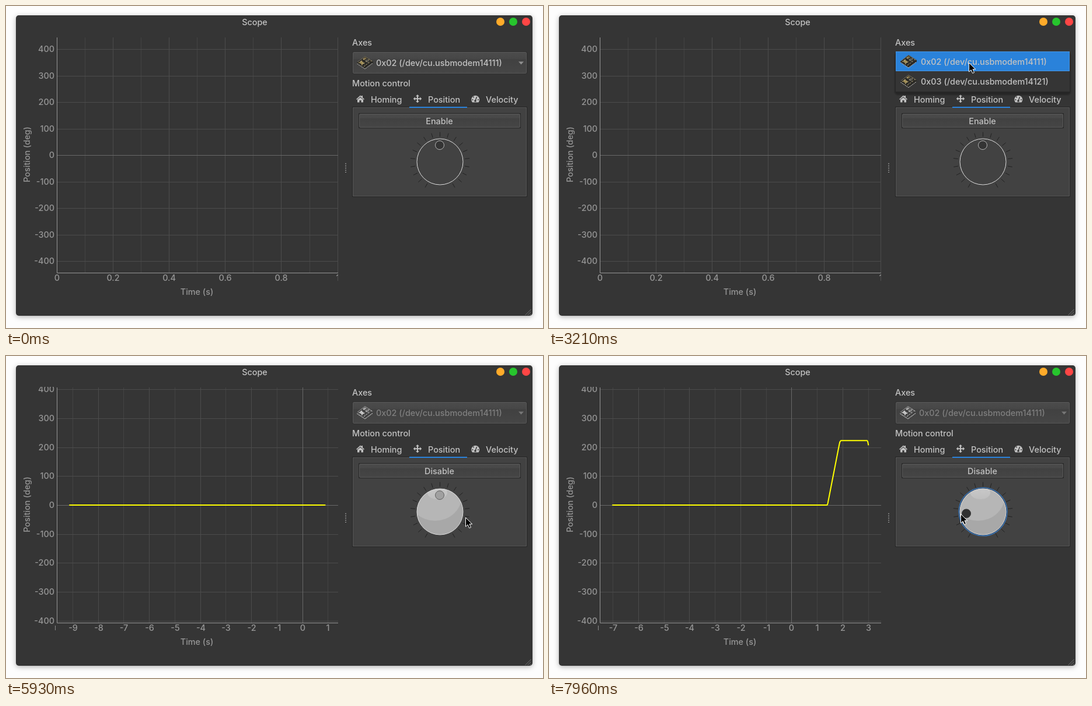
Animation of 920x553 px, one loop 8 s. Source, as an HTML page:

```html
<!DOCTYPE html>
<html lang="en">
<head>
<meta charset="utf-8">
<title>Scope</title>
<style>
html, body { margin: 0; width: 100%; height: 100%; overflow: hidden; background: #fdfdfd; }
svg { display: block; width: 920px; height: 553px; font: 500 14.4px Inter, Roboto, sans-serif; }
text { fill: #c2c2c2; white-space: pre; }
.axis text { fill: #969696; }
.mid { text-anchor: middle; }
.end { text-anchor: end; }
.win { filter: drop-shadow(0 2px 4px rgba(0,0,0,.3)); }
</style>
</head>
<body>
<svg viewBox="0 0 920 553">
  <defs>
    <linearGradient id="face" x1="0" y1="0" x2="0" y2="1">
      <stop offset="0" stop-color="#4c4c4c"/><stop offset=".3" stop-color="#474747"/>
      <stop offset=".34" stop-color="#414141"/><stop offset="1" stop-color="#464646"/>
    </linearGradient>
    <linearGradient id="gloss" x1="0" y1="0" x2="0" y2="1">
      <stop offset="0" stop-color="#cacaca"/><stop offset="1" stop-color="#bfbfbf"/>
    </linearGradient>
    <clipPath id="plotClip"><rect x="88" y="54" width="481" height="405"/></clipPath>
    <clipPath id="xClip"><rect x="83" y="459" width="486" height="20"/></clipPath>
    <clipPath id="yClip"><rect x="40" y="53" width="47" height="420"/></clipPath>
    <clipPath id="dialClip"><circle cx="743.5" cy="267.5" r="39.5"/></clipPath>
    <g id="board" fill="none">
      <path d="M0 11L14 0L28 9L28 12L14 22L0 13Z" fill="#2b2a26"/>
      <path d="M1 10.5L14 .5L27 9" stroke="#77715f"/>
      <path d="M4 11L8 8L13 12L9 15Z" fill="#a08d55"/>
      <path d="M10 5L14 2L17 4L13 7Z" fill="#80714a"/>
      <path d="M14 8L18 5L22 8L18 11Z" fill="#55544e"/>
      <path d="M3 12L15 3M8 16L22 5M12 18L25 8" stroke="#d3bf83" stroke-dasharray="2 3"/>
      <path d="M6 9L16 17M11 5L21 13" stroke="#e9e4d2" stroke-dasharray="1 4"/>
      <path d="M.5 13L14 22L27.5 12" stroke="#d8d8d8" stroke-dasharray="2 1"/>
    </g>
  </defs>

  <rect class="win" x="17" y="16" width="885" height="516" rx="5" fill="#353535"/>
  <text class="mid" x="426" y="33">Scope</text>
  <circle cx="847" cy="27" r="7" fill="#ffab2a"/>
  <circle cx="869" cy="27" r="7" fill="#27c52d"/>
  <circle cx="891" cy="27" r="7" fill="#ff4645"/>

  <g class="axis">
    <g id="grid" clip-path="url(#plotClip)" fill="none">
      <path id="minor" stroke="#434343"/>
      <path id="major" stroke="#4c4c4c"/>
      <path id="zero" stroke="#686868"/>
    </g>
    <path d="M87.5 54V458.5H569" stroke="#969696" fill="none"/>
    <path id="edge" d="M84.5 463V471" stroke="#8a8a8a"/>
    <g id="yLabels" class="end" clip-path="url(#yClip)"></g>
    <g id="xLabels" class="mid" clip-path="url(#xClip)"></g>
    <text class="mid" x="327" y="496">Time (s)</text>
    <text class="mid" transform="translate(41 255) rotate(-90)">Position (deg)</text>
    <path id="trace" clip-path="url(#plotClip)" stroke="#ff0" stroke-width="2" stroke-linejoin="round" fill="none"/>
  </g>

  <path d="M582 270V288" stroke="#a4a4a4" stroke-width="2" stroke-dasharray="1 2"/>
  <path d="M890 530.5l10 -10M894 530.5l6 -6M898 530.5l2 -2" stroke="#b4b4b4" stroke-dasharray="1.4 1.4"/>

  <text x="593" y="68">Axes</text>
  <rect x="593.5" y="78.5" width="299" height="38" rx="1" fill="#292929"/>
  <rect x="594.5" y="79.5" width="297" height="36" rx="1" fill="url(#face)" stroke="#595959"/>
  <g id="combo"><use href="#board" x="601" y="86"/></g>
  <text id="port" x="634" y="103">0x02 (/dev/cu.usbmodem14111)</text>
  <path id="arrow" d="M878 95.5h9l-4.5 5Z" fill="#8f8f8f"/>
  <text x="593" y="138">Motion control</text>

  <rect x="593.5" y="173.5" width="299" height="154" fill="#424242" stroke="#252525"/>
  <path d="M594.5 326.5V174.5H891.5V326.5Z" stroke="#565656" fill="none"/>
  <g fill="#c2c2c2">
    <path d="M600 160L607 153.5L609 155.3V154H611V157.3L614 160L613 161L607 155.8L601 161ZM602 161L607 157L612 161V165.5H608.5V162H605.5V165.5H602Z"/>
    <path d="M705 152l3 3.2h-2v3h3.2v-2l3 3l-3 3v-2h-3.2v3h2l-3 3l-3 -3h2v-3h-3.2v2l-3 -3l3 -3v2h3.2v-3h-2Z"/>
    <path d="M799 165.5A7 7 0 1 1 809.5 165.5Z"/>
  </g>
  <path d="M804 163L806.5 156" stroke="#353535" stroke-width="1.4"/>
  <g fill="#353535"><circle cx="804" cy="163" r="1.8"/><circle cx="799.3" cy="161" r="1"/><circle cx="801" cy="156.6" r="1"/><circle cx="809" cy="161" r="1"/></g>
  <text x="625" y="166">Homing</text>
  <text x="723" y="166">Position</text>
  <text x="822" y="166">Velocity</text>
  <rect x="691" y="173" width="99" height="2" fill="#2a82da"/>

  <rect x="604" y="184" width="278" height="26" rx="1" fill="#262626"/>
  <rect id="button" x="605.5" y="185.5" width="275" height="23" rx="1"/>
  <text id="action" class="mid" x="742.5" y="203"></text>

  <path id="notches" stroke="#222"/>
  <circle id="focus" cx="743.5" cy="267.5" r="41.3" stroke="#3873b5" stroke-width="1.6" fill="#343a42"/>
  <g id="knob" clip-path="url(#dialClip)">
    <rect x="703" y="227" width="81" height="81" fill="#a8a8a8"/>
    <ellipse cx="735" cy="240" rx="46" ry="43" fill="#b6b6b6"/>
    <ellipse cx="739" cy="235" rx="17" ry="11" fill="url(#gloss)"/>
  </g>
  <circle cx="743.5" cy="267.5" r="39.5" stroke="#dedede" fill="none"/>
  <circle id="handle" r="7.5"/>

  <g id="popup">
    <rect x="591" y="79" width="304" height="75" rx="7" fill="#222" opacity=".35"/>
    <rect x="593" y="78" width="300" height="74" rx="5" fill="#262626"/>
    <rect x="594" y="78" width="298" height="69" fill="#353535"/>
    <rect id="hot" x="594.5" width="297" height="33" fill="#2a82da" stroke="#4595e2"/>
    <use href="#board" x="602" y="84"/><use href="#board" x="602" y="118"/>
    <text x="637" y="101">0x02 (/dev/cu.usbmodem14111)</text>
    <text x="637" y="135">0x03 (/dev/cu.usbmodem14121)</text>
  </g>
  <path id="cursor" d="M0 0V15.5L3.6 12.2L6.2 18L9 16.8L6.5 11.2H11.3Z" fill="#000" stroke="#fff" stroke-linejoin="round"/>
</svg>
<script>
const $ = id => document.getElementById(id);
const LOOP = 8000, OPEN = 2050, CLOSE = 3700, ENABLE = 5010, TURN = 6375, BACK = 7895;
const SPEED = 43.75; // plot pixels per second

// screen updates: start, end, count
const bursts = [[1500, 2130, 9], [2550, 3210, 12], [3630, 4350, 11], [4470, 4470, 1],
  [5010, 5760, 14], [5820, 6610, 15], [6670, 7430, 14], [7490, 7960, 9]];
const clock = [[5010, 0], [5930, .914], [6720, 1.766], [7490, 2.526], [7960, 3.018]];
const path = [[1500, 738, -4], [1980, 721, 94], [2550, 720, 95], [2820, 724, 126], [2930, 724, 127],
  [3210, 719, 97], [3700, 719, 97], [4350, 693, 202], [5080, 693, 202], [5700, 786, 276],
  [5930, 787, 277], [6050, 787, 277], [6340, 772, 266], [6760, 772, 266], [6880, 778, 268],
  [7400, 705, 270], [7960, 705, 271]];

function snap(t) {
  let s = 0;
  for (const [a, b, n] of bursts) {
    for (let i = 0; i < n; i++) {
      const u = Math.floor((a + (b - a) * i / Math.max(1, n - 1)) / 10) * 10;
      if (u <= t) s = u;
    }
  }
  return s;
}

function along(keys, t, ease = p => p) {
  if (t <= keys[0][0]) return keys[0].slice(1);
  for (let i = 1; i < keys.length; i++) {
    const a = keys[i - 1], b = keys[i];
    if (t <= b[0]) {
      const p = ease((t - a[0]) / (b[0] - a[0]));
      return a.slice(1).map((v, k) => v + (b[k + 1] - v) * p);
    }
  }
  return keys[keys.length - 1].slice(1);
}
const smooth = p => p * p * (3 - 2 * p);
const show = (id, on) => $(id).setAttribute('display', on ? 'inline' : 'none');
const set = (id, attrs) => { for (const k in attrs) $(id).setAttribute(k, attrs[k]); };
const label = (x, y, s) => `<text x="${x}" y="${y}">${s}</text>`;

function drawAxes(on, now) {
  const d = { minor: '', major: '', zero: '' };
  const pxX = on ? SPEED : 480.6, pxY = on ? .4965 : .455;
  const x0 = on ? 548 - now * pxX : 87.5;
  const step = on ? 1 : .1;
  const first = on ? Math.ceil(now - 10.5) : 0, last = on ? Math.floor(now + .5) : 10;
  const evens = Math.floor(last / 2) - Math.ceil(first / 2) + 1;
  let xs = '', ys = '';
  for (let i = first; i <= last; i++) {
    const x = Math.floor(x0 + i * step * pxX), even = i % 2 === 0;
    d[i === 0 ? 'zero' : even ? 'major' : 'minor'] += `M${x + .5} 54V458`;
    // odd labels vanish when six even ones already fit
    if (even || (on && evens < 6)) xs += label(x + (i < 0 ? 1 : .5), 472, on ? i : +(i * step).toFixed(1));
  }
  for (let v = -400; v <= 400; v += 100) {
    const y = Math.round(256 - v * pxY);
    d[v ? 'major' : 'zero'] += `M88 ${y + .5}H569`;
    ys += label(83, y + 5, v);
  }
  for (const k in d) set(k, { d: d[k] });
  $('xLabels').innerHTML = xs;
  $('yLabels').innerHTML = ys;
  show('edge', on && now > .5);
}

function drawTrace(on, now) {
  show('trace', on);
  if (!on) return;
  const end = now - .015;
  const pts = [[now - 10.05, 0], [1.385, 0], [1.41, 6], [1.86, 210], [1.885, 219], [1.92, 223], [2.95, 223], [2.975, 219], [3.1, 164]];
  const shown = pts.filter(p => p[0] < end);
  shown.push([end, along(pts, end)[0]]);
  set('trace', { d: 'M' + shown.map(([t, v]) => `${(548 + (t - now) * SPEED).toFixed(2)} ${(256 - v * .4965).toFixed(2)}`).join('L') });
}

function drawPanel(s, on, y) {
  const pressed = s >= 4470 && !on, turned = s >= TURN;
  $('action').textContent = on ? 'Disable' : 'Enable';
  set('button', { fill: pressed ? '#393939' : 'url(#face)', stroke: pressed ? '#4c4c4c' : '#5a5a5a' });
  set('combo', { style: on ? 'filter:grayscale(1) brightness(1.6);opacity:.8' : '' });
  set('port', { style: on ? 'fill:#7f7f7f' : '' });
  set('arrow', { fill: on ? '#777' : '#8f8f8f' });
  show('knob', on);
  show('focus', turned);
  const [cx, cy] = s >= BACK ? [715, 270.5] : turned ? [771, 268] : [743, 239];
  set('handle', { cx, cy, fill: turned ? '#303030' : on ? '#a0a0a0' : '#343434',
    stroke: turned ? '#353535' : on ? '#626262' : '#b2b2b2' });
  show('popup', s >= OPEN && s < CLOSE);
  set('hot', { y: y > 111 ? 112.5 : 78.5 });
}

let notches = '';
for (let k = -9; k <= 9; k++) {
  const a = k * Math.PI / 10.8, sx = Math.sin(a), cy = Math.cos(a);
  notches += `M${743.5 + 43 * sx} ${267.5 - 43 * cy}L${743.5 + 51 * sx} ${267.5 - 51 * cy}`;
}
set('notches', { d: notches });

let drawn = -1;
function render(t) {
  const s = snap(t);
  if (s === drawn) return;
  drawn = s;
  const on = s >= ENABLE, now = along(clock, s)[0];
  const [x, y] = along(path, s, smooth);
  drawAxes(on, now);
  drawTrace(on, now);
  drawPanel(s, on, y);
  show('cursor', s >= 1500);
  set('cursor', { transform: `translate(${Math.round(x) + .5} ${Math.round(y) + .5})` });
}

const start = performance.now();
function tick() {
  render((performance.now() - start) % LOOP);
  requestAnimationFrame(tick);
}
tick();
</script>
</body>
</html>
```
